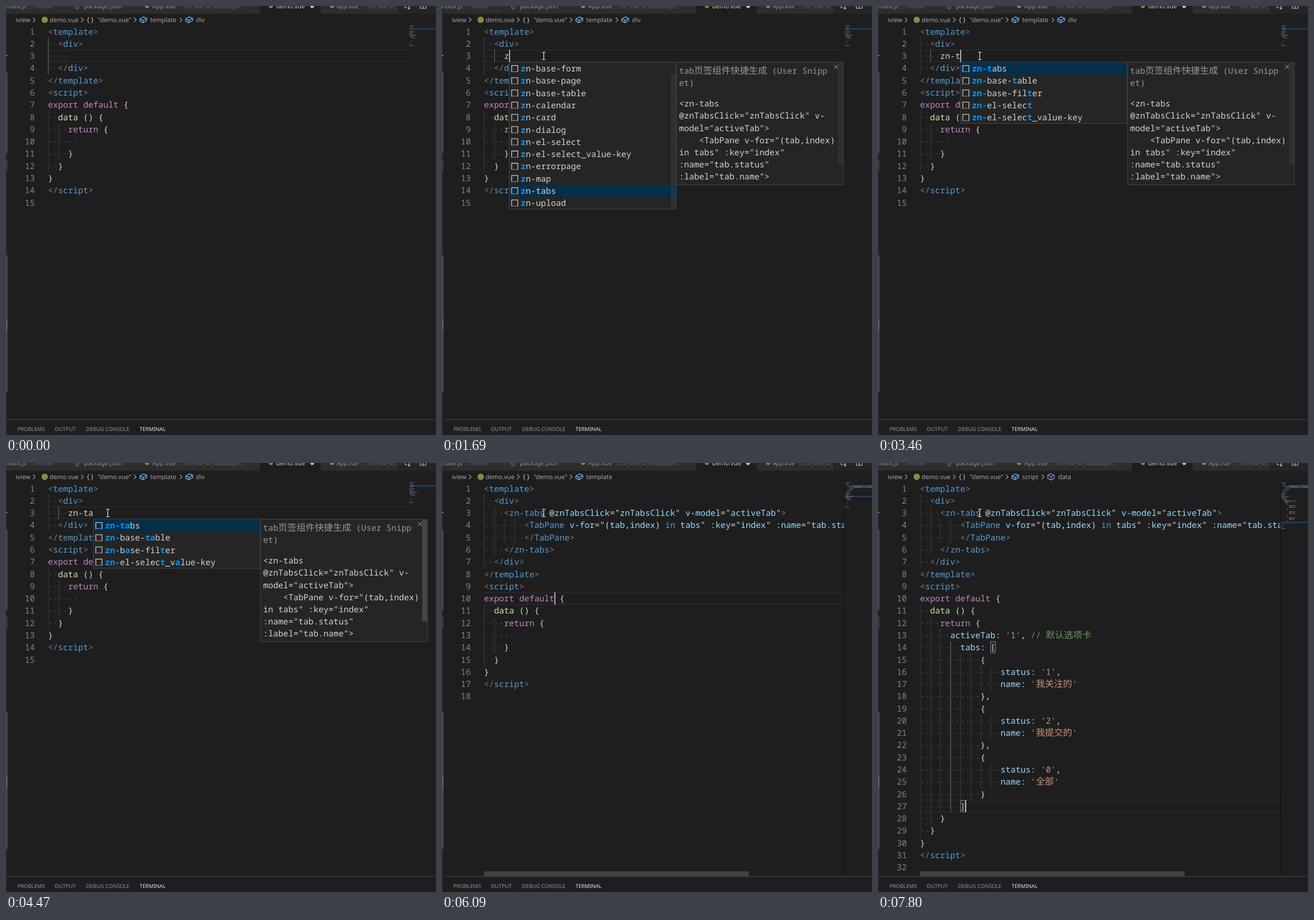
Animation of 750x747 px, one loop 8 s. Source, as an HTML page with a canvas:

```html
<!DOCTYPE html>
<html lang="en">
<head>
<meta charset="utf-8">
<title>Snippet completion</title>
<style>
html, body { margin: 0; width: 100%; height: 100%; overflow: hidden; background: #1e1e1e; }
canvas { display: block; width: 750px; height: 747px; }
</style>
</head>
<body>
<canvas id="stage"></canvas>
<script>
const W = 750, H = 747, LOOP = 8000;
const canvas = document.getElementById('stage');
const ctx = canvas.getContext('2d');
const dpr = window.devicePixelRatio || 1;
canvas.width = W * dpr;
canvas.height = H * dpr;

const MONO = '14.633px "Noto Sans Mono", monospace';
const CJK = '15.9px "Noto Sans CJK SC", "Noto Sans CJK", sans-serif';
const ui = size => `${size}px "Noto Sans", sans-serif`;

// Editor grid
const X0 = 73.2, CW = 8.78, LH = 21.28, EDGE = 703;
const colX = col => X0 + col * CW;
const rowY = line => 44.4 + (line - 1) * LH;

const COLORS = {
  tag: '#569cd6', bracket: '#808080', string: '#ce9178', comment: '#6a9955',
  keyword: '#c586c0', method: '#dcdcaa', name: '#9cdcfe', text: '#d4d4d4'
};
const TOKEN = new RegExp([
  '(?<tag>(?<=</?)[\\w-]+|\\bin\\b)', '(?<bracket></?|>)', "(?<string>'[^']*')", '(?<comment>//.*)',
  '(?<keyword>\\b(?:export|default|return)\\b)', '(?<method>data(?= \\())', '(?<name>[\\w-]+)', '(?<text>\\S)'
].join('|'), 'g');

const TABS = [
  '    <zn-tabs @znTabsClick="znTabsClick" v-model="activeTab">',
  '        <TabPane v-for="(tab,index) in tabs" :key="index" :name="tab.status" :label="tab.name">',
  '        </TabPane>',
  '    </zn-tabs>'
];
const entry = (status, name, end) => [
  '            {',
  `                status: '${status}',`,
  `                name: '${name}'`,
  '            }' + end
];
const DATA = [
  "      activeTab: '1', // 默认选项卡",
  '        tabs: [',
  ...entry(1, '我关注的', ','), ...entry(2, '我提交的', ','), ...entry(0, '全部', ''),
  '        ]'
];
const makeDoc = (body, data) => [
  '<template>', '  <div>', ...body, '  </div>', '</template>', '<script>',
  'export default {', '  data () {', '    return {', ...data, '    }', '  }', '}', '<\/script>', ''
];

// Timeline, in ms
const TYPED = 'zn-ta';
const TYPE_AT = [1690, 1840, 3150, 3460, 3690];
const POPUP_AT = [1690, 1920, 3230, 3460, 3780];
const INSERT_TABS = 4550, INSERT_DATA = 7720;
const MOVE_DOWN = [5630, 5780, 5940, 6090, 6260, 6410, 6870];
const CARET_ON = [760, 1690, 3070, 4550, 5630, 7720];
const CARET_FADE = [1390, 2460, 4320, 5170, 7500];
const CRUMBS = [
  [0, 'template', 'div'], [4850, 'template', 'div', 'zn-tabs'], [5710, 'template', 'div'],
  [5860, 'template'], [6260, 'script'], [6480, 'script', 'data']
];
const passed = (times, t) => times.filter(at => t >= at).length;
const latest = (times, t) => times[passed(times, t) - 1] ?? -1;

const PREFIXED = ['base-form', 'base-page', 'base-table', 'calendar', 'card', 'dialog', 'el-select',
  'el-select_value-key', 'errorpage', 'map', 'tabs', 'upload'].map(name => 'zn-' + name);
// Matched letters sit between asterisks
const FILTERED = {
  4: ['*zn-t*abs', '*zn-*base-*t*able', '*zn-*base-fil*t*er', '*zn-*el-selec*t*', '*zn-*el-selec*t*_value-key'],
  5: ['*zn-ta*bs', '*zn-*base-*ta*ble', '*zn-*b*a*se-fil*t*er', '*zn-*el-selec*t*_v*a*lue-key']
};
const DETAIL = ['tab页签组件快捷生成 (User Snipp', 'et)', '', '<zn-tabs', '@znTabsClick="znTabsClick" v-',
  'model="activeTab">', '    <TabPane v-for="(tab,index)', 'in tabs" :key="index"', ':name="tab.status"', ':label="tab.name">'];

function fill(color, x, y, w, h) {
  ctx.fillStyle = color;
  ctx.fillRect(x, y, w, h);
}
function dot(color, x, y, r) {
  ctx.fillStyle = color;
  ctx.beginPath();
  ctx.arc(x, y, r, 0, 7);
  ctx.fill();
}
function stroke(color, width, ...paths) {
  ctx.strokeStyle = color;
  ctx.lineWidth = width;
  ctx.beginPath();
  for (const path of paths) path.forEach(([x, y], i) => i ? ctx.lineTo(x, y) : ctx.moveTo(x, y));
  ctx.stroke();
}
function label(text, x, y, color, font) {
  ctx.font = font;
  ctx.fillStyle = color;
  ctx.fillText(text, x, y);
  return x + ctx.measureText(text).width;
}
// Code text; wide characters use their own font. Returns the end x.
function code(text, x, y, color, weight = '') {
  for (const run of text.match(/[\u4e00-\u9fff]+|[^\u4e00-\u9fff]+/g) || []) {
    const wide = run.charCodeAt(0) >= 0x4e00;
    label(run, x, y + 5.2, color, wide ? CJK : `${weight} ${MONO}`);
    x += run.length * (wide ? 15.9 : CW);
  }
  return x;
}

function tokens(line) {
  if (/^\s+[\w-]+$/.test(line)) return [{ text: line.trim(), col: line.search(/\S/), color: COLORS.text }];
  return [...line.matchAll(TOKEN)].map(m => {
    const kind = Object.keys(m.groups).find(key => m.groups[key] !== undefined);
    return { text: m[0], col: m.index, color: COLORS[kind] };
  });
}

function editorState(t) {
  const typed = passed(TYPE_AT, t);
  if (t < INSERT_TABS) {
    return { lines: makeDoc(['    ' + TYPED.slice(0, typed)], ['      ']), line: 3, col: 4 + typed };
  }
  if (t >= INSERT_DATA) return { lines: makeDoc(TABS, DATA), line: 27, col: 9 };
  const lines = makeDoc(TABS, ['      ']);
  const line = 6 + passed(MOVE_DOWN, t);
  return { lines, line, col: Math.min(14, lines[line - 1].length) };
}

function drawGuides(lines, current) {
  const indents = [];
  lines.forEach((text, i) => {
    const first = text.search(/\S/);
    indents.push(first < 0 ? (text ? indents[i - 1] : 0) : first);
  });
  const active = indents[current - 1] - 2;
  let from = current - 1, to = current - 1;
  while (indents[from - 1] > active) from--;
  while (indents[to + 1] > active) to++;
  indents.forEach((indent, i) => {
    for (let col = 0; col < indent; col += 2) {
      const lit = col === active && i >= from && i <= to;
      fill(lit ? '#707070' : '#404040', Math.round(colX(col)) + 0.2, rowY(i + 1) - LH / 2, 1, LH);
    }
  });
}

function caretAlpha(t) {
  const on = latest(CARET_ON, t), fade = latest(CARET_FADE, t);
  if (on < 0) return 0;
  return fade > on ? Math.max(0, 1 - (Math.floor((t - fade) / 75) + 1) / 3) : 1;
}

function drawMinimap(lines, current) {
  const top = i => 33.2 + i * 2.66;
  fill('#1f3f60', EDGE, top(current - 1), W - EDGE, 2.4);
  ctx.globalAlpha = 0.55;
  lines.forEach((line, i) => {
    for (const tk of tokens(line)) fill(tk.color, EDGE + tk.col * 0.88, top(i) + 0.6, tk.text.length * 0.88, 1.3);
  });
  ctx.globalAlpha = 1;
}

function drawEditor(t) {
  const { lines, line, col } = editorState(t);
  const top = rowY(line) - LH / 2;
  fill('#2b2b2b', 74, top - 0.4, EDGE - 74, 1.4);
  fill('#2b2b2b', 74, top + LH - 1.4, EDGE - 74, 1.4);
  drawGuides(lines, line);

  ctx.save();
  ctx.beginPath();
  ctx.rect(0, 34, EDGE, 685);
  ctx.clip();
  lines.forEach((text, i) => {
    const y = rowY(i + 1), number = String(i + 1);
    code(number, 50.4 - number.length * CW, y, '#858585');
    const indent = text.match(/^ */)[0].length;
    for (let c = 0; c < indent; c++) dot('#474747', colX(c + 0.5), y + 0.8, 1.1);
    for (const tk of tokens(text)) code(tk.text, colX(tk.col), y, tk.color);
  });
  ctx.restore();

  if (t >= INSERT_DATA) {
    ctx.strokeStyle = '#888';
    ctx.lineWidth = 1;
    for (const [row, c] of [[14, 14], [27, 8]]) {
      ctx.strokeRect(colX(c) + 0.5, rowY(row) - LH / 2 + 0.8, CW - 0.6, LH - 1.8);
    }
  }
  ctx.globalAlpha = caretAlpha(t);
  fill('#d0d0cd', colX(col) - 0.1, top, 1.6, LH);
  ctx.globalAlpha = 1;

  drawMinimap(lines, line);
  if (t >= INSERT_TABS) {
    fill('#141414', 701.5, 34, 1.5, 685);
    fill('#424242', 73.5, 711, 461.5, 8.5);
  }
}

function panel(x, y, w, h) {
  fill('#454545', x, y, w, h);
  fill('#252526', x + 1, y + 1, w - 2, h - 2);
}

function drawPopup(t) {
  const stage = passed(POPUP_AT, t);
  if (!stage || t >= INSERT_TABS) return;
  const items = FILTERED[stage] || PREFIXED.map(name => `*${name.slice(0, stage)}*${name.slice(stage)}`);
  const selected = stage > 3 ? 0 : 10;
  const x = colX(4 + stage) - 0.2, y = 97.8, w = 292, detailX = x + w - 0.5;

  panel(x, y, w, items.length * 21.27 + 0.9);
  items.forEach((item, i) => {
    const mid = 109 + i * 21.27;
    if (i === selected) fill('#062f4a', x + 1, mid - 10.6, w - 2, 21.2);
    const left = x + 4.6, right = x + 15.4, up = mid - 5.4, down = mid + 5.4;
    stroke('#c5c5c5', 1.3, [[left, down], [left, up], [right, up], [right, down]]);
    ctx.setLineDash([1.6, 1.4]);
    stroke('#c5c5c5', 1.3, [[left, down], [right, down]]);
    ctx.setLineDash([]);
    let textX = x + 20.4;
    item.split('*').forEach((part, k) => {
      textX = code(part, textX, mid, k % 2 ? '#0097fb' : '#d4d4d4', k % 2 ? 'bold' : '');
    });
  });
  const bar = Math.min(1, Math.max(0, (2840 - t) / 440));
  if (bar) fill(`rgba(121,121,121,${0.13 * bar})`, x + w - 10, 119, 9, 232);

  panel(detailX, y, w, 214);
  fill(`rgba(121,121,121,${stage === 5 ? 0.38 : 0.12})`, detailX + w - 9.5, y + 1, 8.5, 177);
  DETAIL.forEach((text, i) => code(text, detailX + 5, 112.6 + i * 21.2 - (i > 2 ? 6.3 : 0), i < 2 ? '#999' : '#d4d4d4'));
  const cx = detailX + w - 13, cy = 106;
  stroke('#b0b0b0', 1, [[cx - 3.5, cy - 3.5], [cx + 3.5, cy + 3.5]], [[cx + 3.5, cy - 3.5], [cx - 3.5, cy + 3.5]]);
}

function drawTabBar() {
  fill('#252526', 0, 0, W, 13.5);
  for (const [x, w] of [[0, 106], [107, 120], [228, 214], [549, 134]]) fill('#2d2d2d', x, 0, w, 13.5);
  fill('#1e1e1e', 443, 0, 105.5, 13.5);
  const name = '#969696', path = '#666', olive = '#8d8a45', y = 4;
  label('ndex.js', 0, y, name, ui(10.8));
  label('...\\router', 42, y, path, ui(9.7));
  label('{}', 120, y, '#a98d3f', ui(10.8));
  label('package.json', 136, y, name, ui(10.8));
  label('App.vue', 255, y, name, ui(10.8));
  label('...\\zn_vue_ui_basepage\\...', 301, y, path, ui(9.7));
  label('demo.vue', 471, y, '#d8d6b8', '500 ' + ui(10.8));
  label('App.vue', 577, y, name, 'italic ' + ui(10.8));
  label('...\\zn_vue_ui_', 622, y, path, ui(9.7));
  for (const x of [246, 462, 569]) dot(olive, x, 0, 3.6);
  dot('#c5c5c5', 534, 0, 3.4);
  stroke('#c5c5c5', 1.1, [[696, 0], [696, 3], [700, 3]], [[703, 0], [703, 3]], [[722.5, 0], [722.5, 4], [732.5, 4], [732.5, 0]], [[727.5, 0], [727.5, 4]]);
  dot('#c5c5c5', 703, 4, 1.7);
}

function chevron(x) {
  stroke('#a0a0a0', 1.1, [[x - 2, 20], [x + 2, 24], [x - 2, 28]]);
}
function cube(x, flat, color) {
  const p = (...pairs) => pairs.map(([a, b]) => [x + a, (flat ? 18.5 : 17.8) + b]);
  const [outline, ridge, edge] = flat
    ? [[[0.5, 4], [7, 0.5], [12.5, 3], [12.5, 7], [6, 10.5], [0.5, 8], [0.5, 4]], [[0.5, 4], [6, 6.5], [12.5, 3]], [[6, 6.5], [6, 10.5]]]
    : [[[6, 0.5], [11.5, 3], [11.5, 9], [6, 12], [0.5, 9], [0.5, 3], [6, 0.5]], [[0.5, 3], [6, 6], [11.5, 3]], [[6, 6], [6, 12]]];
  stroke(color, 1.2, p(...outline), p(...ridge), p(...edge));
}

function drawBreadcrumb(t) {
  const color = '#a9a9a9', font = ui(10.8), y = 27.8;
  label('iview', 17, y, color, font);
  chevron(49);
  dot('#8d8a45', 67.5, 24, 5.5);
  label('demo.vue', 76, y, color, font);
  chevron(133);
  label('{ }', 141, y, '#c5c5c5', ui(11.5));
  label('"demo.vue"', 160, y, color, font);
  chevron(225);
  const [, ...names] = CRUMBS[passed(CRUMBS.map(c => c[0]), t) - 1];
  let x = 233;
  names.forEach((name, i) => {
    if (i) chevron(x - 8);
    const method = name === 'data';
    cube(x, !method, method ? '#b180d7' : '#75beff');
    x = label(name, x + 18.5, y, color, font) + 16;
  });
}

function drawFrame() {
  fill('#252526', 0, 13, 2.6, H);
  fill('#484848', 0, 116, 2.6, 140);
  fill('#3a3a3d', 0, 268, 2.6, 19);
  fill('#4c4c4c', 0, 434, 2.6, 238);
  fill('#5c5c5c', 0, 545, 2.6, 19);
  fill('#d0d0d0', 0, 85.5, 1.8, 1.4);
  fill('#414141', 2.6, 719.6, W, 1.1);
  const items = [['PROBLEMS', 20], ['OUTPUT', 85], ['DEBUG CONSOLE', 139.5], ['TERMINAL', 233]];
  for (const [text, x] of items) label(text, x, 739.7, x === 233 ? '#e7e7e7' : '#979797', ui(9.25));
}

function drawPointer(t) {
  if (t < 210) return;
  const p = Math.min(5, Math.floor((t - 210) / 80)) / 5;
  const ease = p * p * (3 - 2 * p);
  const settled = t >= 760;
  const x = settled ? 177.5 : 535 + (182 - 535) * ease;
  const y = settled ? 87 : 602 + (87.5 - 602) * ease;
  const serif = dy => [[x - 3, y + dy], [x + 3, y + dy]];
  stroke('#e4e4e4', 1.2, [[x, y - 6.5], [x, y + 6.5]], serif(-6.5), serif(6.5));
}

const start = performance.now();
function render() {
  const t = (performance.now() - start) % LOOP;
  ctx.setTransform(dpr, 0, 0, dpr, 0, 0);
  ctx.textRendering = 'geometricPrecision';
  fill('#1e1e1e', 0, 0, W, H);
  drawEditor(t);
  drawTabBar();
  drawBreadcrumb(t);
  drawFrame();
  drawPopup(t);
  drawPointer(t);
  requestAnimationFrame(render);
}
render();
</script>
</body>
</html>
```
